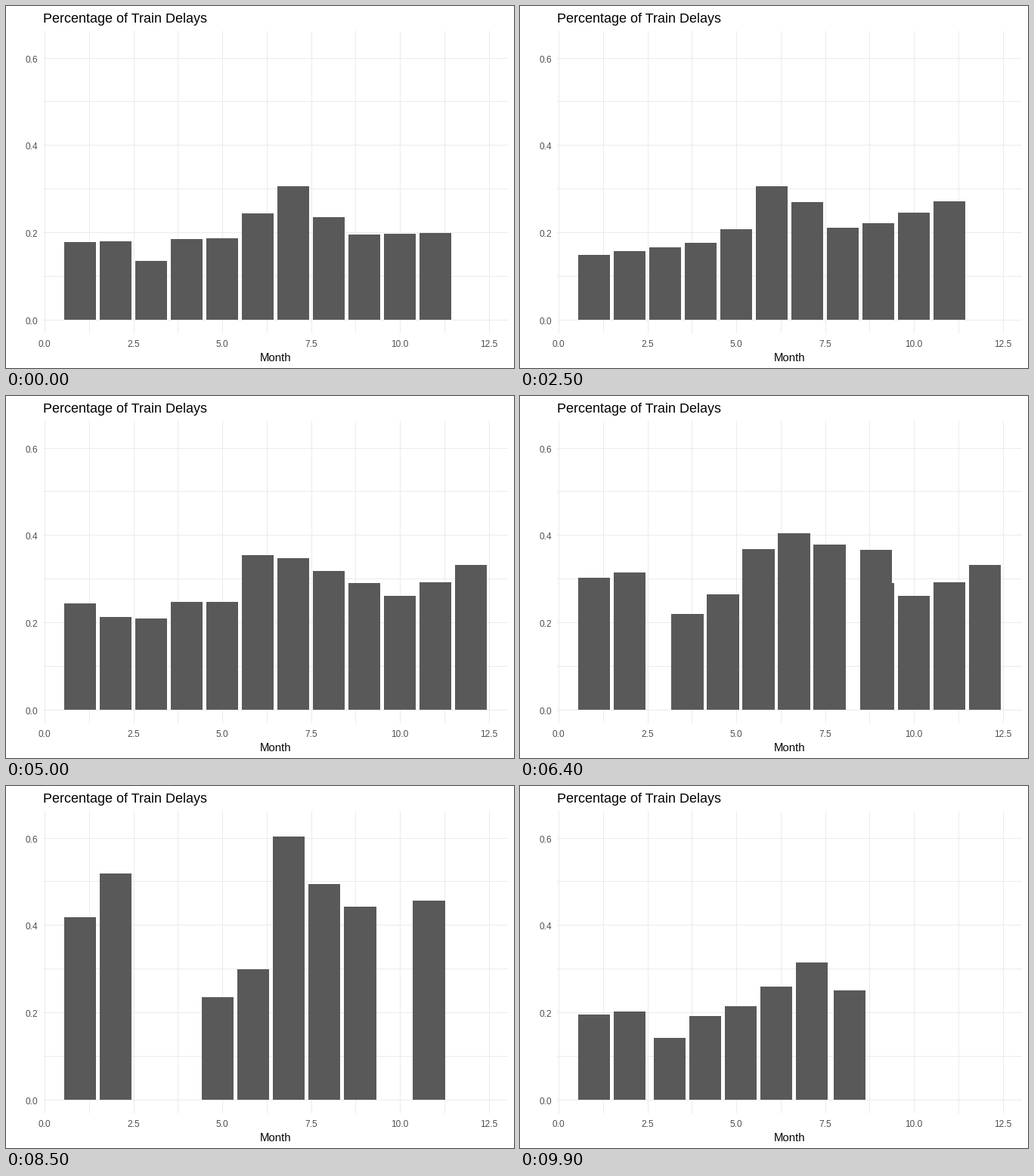
A matplotlib script that plays this animation: 672x480 px, repeating every 10000 ms.

```python
import math

import matplotlib.pyplot as plt
import numpy as np
from matplotlib.animation import FuncAnimation
from matplotlib.patches import Rectangle

plt.rcParams.update({
    "font.family": "Liberation Sans",
    "text.hinting": "native",
    "text.hinting_factor": 8,
    "toolbar": "None",
})

W, H, DPI = 672, 480, 96
LEFT, RIGHT, TOP, BOTTOM = 49, 664, 33, 434
X0, X_UNIT = 51.45, 47.03
Y0, Y_UNIT = 416.2, 578.6
BAR_HALF = 0.45
GRID, BAR, TICK = "#ebebeb", "#595959", "#4d4d4d"
STEPS, HOLD = 25, 9             # steps per year, of which these stand still


def season(months, base, slope, *swings):
    """Bars (month, rate): a straight trend plus triangular swings.

    Each swing is (start, peak, end, height).
    """
    def rate(m):
        return base + slope * m + sum(
            np.interp(m, (start, peak, end), (0, height, 0))
            for start, peak, end, height in swings)
    return [(m, rate(m)) for m in months]


YEARS = [
    season(range(1, 12), .176, .002,
           (2, 3, 4, -.048), (5.1, 7, 8.6, .115)),
    season(range(1, 12), .139, .009,
           (4.75, 6.25, 7.75, .135), (9, 11, 13, .032)),
    season(range(1, 13), .242, .001,
           (1, 2.6, 4, -.052), (5, 6.15, 10.3, .122), (10, 12, 14, .078)),
    season((1, 2, *range(5, 10), 11), .241, 0,
           (-.8, 2, 5, .299), (5.8, 7, 10.25, .39), (8.3, 11, 14, .229)),
]


def px(month):
    return math.floor(X0 + X_UNIT * month)


def py(rate):
    return math.floor(Y0 - Y_UNIT * rate)


fig = plt.figure(figsize=(W / DPI, H / DPI), dpi=DPI, facecolor="white")
ax = fig.add_axes([0, 0, 1, 1])
ax.set_xlim(0, W)
ax.set_ylim(H, 0)
ax.axis("off")


def box(x, y, w, h, color, z):
    patch = Rectangle((x, y), w, h, facecolor=color, linewidth=0,
                      antialiased=False, zorder=z)
    return ax.add_patch(patch)


def label(x, y, text, size, color="black", ha="center"):
    ax.text(x, y, text, fontsize=size * 72 / DPI, color=color,
            ha=ha, va="baseline")


for i in range(11):
    x = px(1.25 * i)
    box(x, TOP, 1, BOTTOM - TOP, GRID, 1)
    if i % 2 == 0:
        label(x, 452, f"{1.25 * i:.1f}", 12, TICK)

for i in range(7):
    y = py(0.1 * i)
    box(LEFT, y, RIGHT - LEFT, 1, GRID, 1)
    if i % 2 == 0:
        label(42, y + 6, f"{0.1 * i:.1f}", 12, TICK, "right")

label(49, 22, "Percentage of Train Delays", 18, ha="left")
label(356.5, 471, "Month", 15)

bars = [box(0, 0, 0, 0, BAR, 2) for _ in range(12)]


def pose(n):
    """Bars at step n; unpaired bars appear or vanish when the move ends."""
    year, step = divmod(n, STEPS)
    hold = HOLD if year else HOLD - 1       # the loop opens one step in
    t = max(0, (step - hold) / (STEPS - hold))
    now, after = YEARS[year], YEARS[(year + 1) % len(YEARS)]
    moved = [(m + (m2 - m) * t, r + (r2 - r) * t)
             for (m, r), (m2, r2) in zip(now, after)]
    return moved + now[len(moved):]


def update(n):
    shown = pose(n)
    for i, bar in enumerate(bars):
        bar.set_visible(i < len(shown))
        if i < len(shown):
            month, rate = shown[i]
            left, right = px(month - BAR_HALF), px(month + BAR_HALF)
            top = py(rate)
            bar.set_bounds(left, top, right - left, py(0) - top)
    return bars


anim = FuncAnimation(fig, update, frames=STEPS * len(YEARS), interval=100,
                     init_func=lambda: update(0), repeat=True,
                     repeat_delay=0, blit=False)
plt.show()
```
